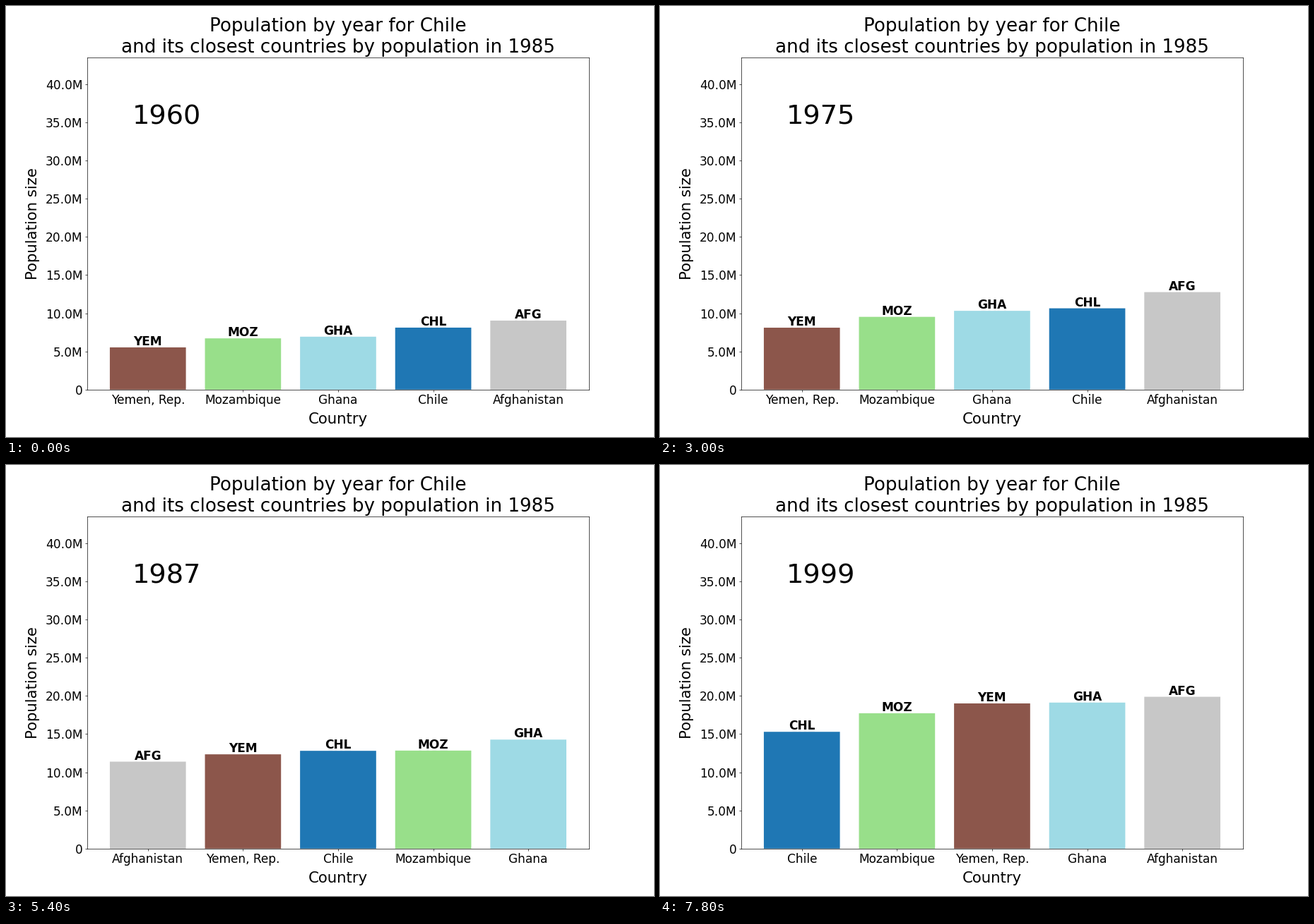
Animation, 917 px wide and 611 px high, one loop 8 s. Source, as a matplotlib script:

```python
import numpy as np
import matplotlib.pyplot as plt
from matplotlib.animation import FuncAnimation
from matplotlib.ticker import FuncFormatter, MultipleLocator

W, H, DPI = 917, 611, 64
PT = W / 15 / DPI  # layout is designed on a 15 x 10 inch page
YEARS = np.arange(1960, 2000)

plt.rcParams.update({
    "font.family": "DejaVu Sans",
    "axes.linewidth": 0.8 * PT,
    **{f"{a}tick.major.{k}": v * PT
       for a in "xy" for k, v in (("size", 3.5), ("pad", 3.5), ("width", 0.8))},
})


def growth(*keys):
    """Smooth yearly curve (cubic Hermite) through (year, millions) keys."""
    t, v = np.array(keys, float).T
    slope = np.gradient(v, t)
    i = np.clip(np.searchsorted(t, YEARS, side="right") - 1, 0, len(t) - 2)
    h = t[i + 1] - t[i]
    s = (YEARS - t[i]) / h
    return ((1 + 2 * s) * (1 - s) ** 2 * v[i] + s * (1 - s) ** 2 * h * slope[i]
            + s * s * (3 - 2 * s) * v[i + 1] + s * s * (s - 1) * h * slope[i + 1])


COUNTRIES = [
    ("YEM", "Yemen, Rep.", "#8c564b",
     growth((1960, 5.53), (1975, 8.11), (1987, 12.35), (1999, 19.02))),
    ("MOZ", "Mozambique", "#98df8a",
     growth((1960, 6.71), (1975, 9.53), (1981, 11.57), (1987, 12.84),
            (1992, 13.61), (1995, 16.0), (1999, 17.73))),
    ("GHA", "Ghana", "#9edae5",
     growth((1960, 6.93), (1975, 10.32), (1987, 14.28), (1999, 19.13))),
    ("CHL", "Chile", "#1f77b4",
     growth((1960, 8.12), (1975, 10.65), (1987, 12.81), (1999, 15.3))),
    ("AFG", "Afghanistan", "#c7c7c7",
     growth((1960, 9.04), (1967, 10.51), (1975, 12.77), (1979, 13.66),
            (1981, 11.94), (1982, 10.99), (1985, 11.43), (1987, 11.39),
            (1991, 12.24), (1994, 16.25), (1999, 19.89))),
]

LABEL_GAP = 0.28  # space between bar and code, in millions

fig, ax = plt.subplots(figsize=(W / DPI, H / DPI), dpi=DPI)
slots = range(len(COUNTRIES))
bars = ax.bar(slots, [1] * len(COUNTRIES), width=0.8, snap=False)
codes = [ax.text(x, 0, "", ha="center", va="baseline", weight="bold", size=20 * PT)
         for x in slots]
year_text = ax.text(0.09, 0.8, "", size=45 * PT, transform=ax.transAxes)

ax.set_xlim(-0.64, 4.64)
ax.set_ylim(0, 43.48)
ax.set_xticks(slots)
ax.yaxis.set_major_locator(MultipleLocator(5))
ax.yaxis.set_major_formatter(FuncFormatter(lambda v, _: f"{v:.1f}M" if v else "0"))
ax.tick_params(labelsize=20 * PT)
ax.set_title("Population by year for Chile\n"
             "and its closest countries by population in 1985",
             size=30.8 * PT, pad=9 * PT)
ax.set_xlabel("Country", size=25 * PT, labelpad=10 * PT)
ax.set_ylabel("Population size", size=25 * PT, labelpad=10 * PT)


def draw(i):
    ranked = sorted(COUNTRIES, key=lambda c: c[3][i])
    for bar, text, (code, _, color, pop) in zip(bars, codes, ranked):
        bar.set_height(pop[i])
        bar.set_facecolor(color)
        text.set_text(code)
        text.set_y(pop[i] + LABEL_GAP)
    ax.set_xticklabels([name for _, name, _, _ in ranked])
    year_text.set_text(str(YEARS[i]))
    return [*bars, *codes, year_text]


anim = FuncAnimation(fig, draw, frames=len(YEARS), interval=200,
                     repeat=True, repeat_delay=0, blit=False)
plt.show()
```
